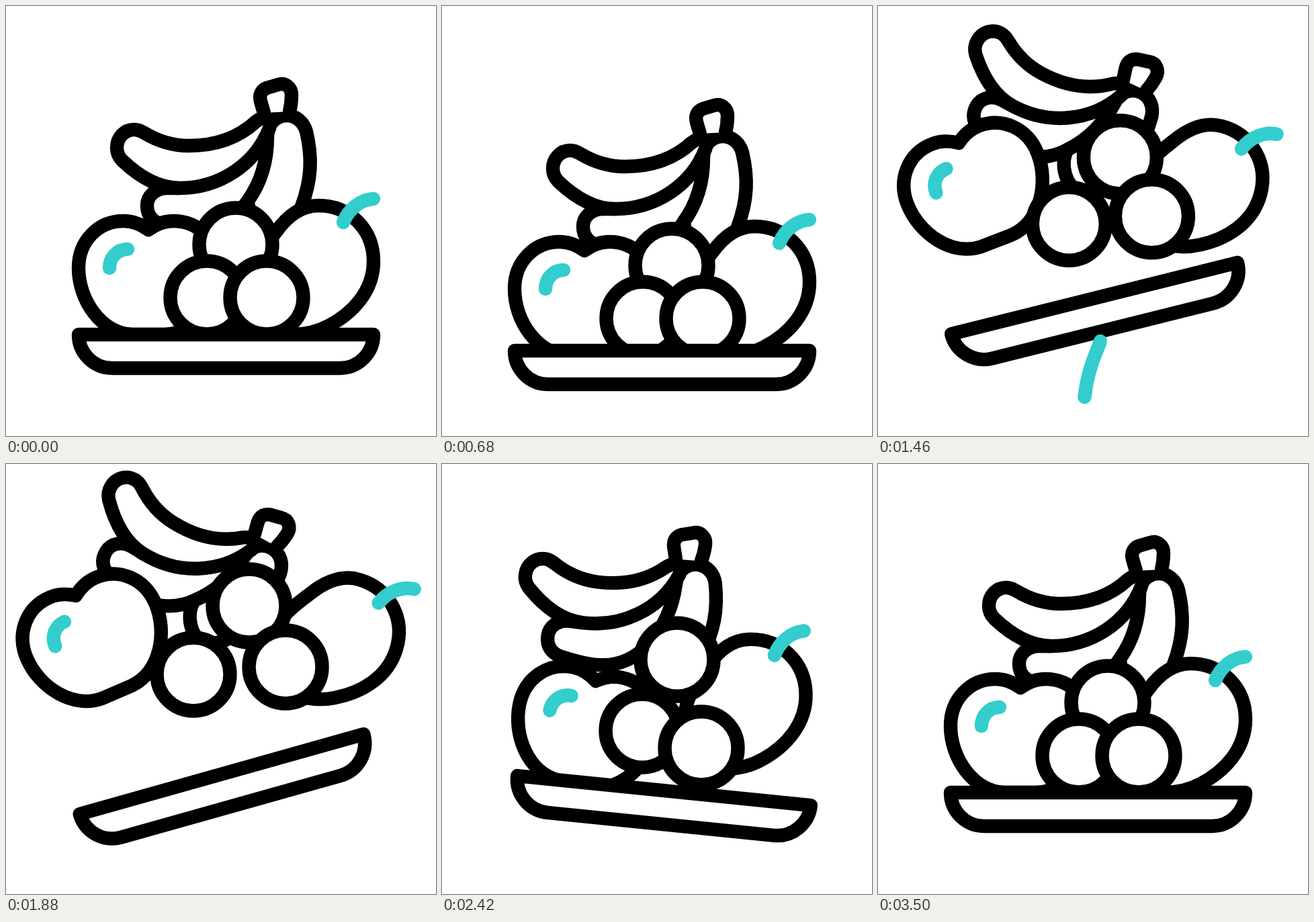
Recreate the animation shown at these times as an HTML page with a canvas. Size 640x640 px, loop 3600 ms.

```html
<!DOCTYPE html>
<html lang="en">
<head>
<meta charset="utf-8">
<title>Fruit plate</title>
<style>
html, body { margin: 0; width: 100%; height: 100%; overflow: hidden; background: #fff; }
canvas { display: block; width: 100vw; height: 100vh; }
</style>
</head>
<body>
<canvas id="stage" width="640" height="640"></canvas>
<script>
const ctx = document.getElementById('stage').getContext('2d');
const LOOP = 3600;
const BLACK = '#000', TEAL = '#33cdcd';

const circle = (x, y) => `M${x - 54.5} ${y}a54.5 54.5 0 1 1 109 0a54.5 54.5 0 1 1 -109 0Z`;
const shape = (d, color = BLACK) => ({ path: new Path2D(d), color });

// Poses are [x, y, degrees]: resting, thrown, floating, falling, bouncing.
const fruits = [
  { // bananas
    poses: [[300, 210, 0], [262.7, 125.2, 25.1], [271.5, 103.6, 31.9], [258, 181, 7.5], [293, 212, -6.7]],
    shapes: [
      shape('M258 271L240 271C222 271 210 283 210 297C210 313 219 322 233 325C255 329 275 332 292 330C322 328 346 311 360 290C378 265 389 235 389 195L396 172Z'),
      shape('M360 290C378 265 389 235 389 195C389 172 405 163 418 163C432 163 443 173 447 187C456 225 455 258 440 298C432 318 420 330 405 335C385 340 360 315 360 290Z'),
      shape('M396 165C387 164 380 166 372 172C345 197 312 208 272 208C249 208 226 201 206 189C201 186 196 184 191 184C176 184 165 196 165 211C165 219 168 225 173 230C193 249 223 271 258 271C318 271 371 236 392 182Z'),
      shape('M384 159L379 142C376 131 381 125 388 122L405 117C416 113 425 122 425 132C425 142 424 149 422 157')
    ]
  },
  { // mango
    poses: [[465, 385, 0], [478, 270, 14], [501, 256.5, 16.7], [459.7, 348.7, -1.7], [465, 385.3, -1]],
    shapes: [
      shape('M402 336C417 315 437 297 465 297C512 297 547 333 547 380C547 425 515 458 480 476C462 486 443 489 425 489C390 489 366 455 366 415C366 385 379 367 402 336Z'),
      shape('M502 322C510 302 528 288 547 287', TEAL)
    ]
  },
  { // apple
    poses: [[212, 405, 0], [157.8, 279, -19.3], [132.5, 262, -23.3], [214, 393.4, 12], [212, 405, -2]],
    shapes: [
      shape('M212 333C201 325 189 320 175 320C137 320 108 350 108 390C108 438 142 487 188 489L236 489C282 487 316 438 316 390C316 350 287 320 249 320C235 320 223 325 212 333Z'),
      shape('M154 390C154 374 166 362 181 362', TEAL)
    ]
  },
  { // berries
    poses: [[342, 355, 0], [359, 237, 0], [362, 211, 0], [350, 291, 0], [344, 348, 0]],
    shapes: [shape(circle(342, 355))]
  },
  {
    poses: [[299, 434, 0], [289, 334, 0], [279, 313, 0], [298, 397, 0], [299, 427, 0]],
    shapes: [shape(circle(299, 434))]
  },
  {
    poses: [[388, 434, 0], [400, 322, 0], [416, 302, 0], [386, 423, 0], [387, 423, 0]],
    shapes: [shape(circle(388, 434))]
  }
];

const plate = {
  poses: [[327.5, 489, 0], [323, 412, -12.5], [321, 461.5, -15.7], [330.5, 486, 5.75], [327.5, 489, 0.2]],
  shapes: [shape('M108 489L547 489A50 50 0 0 1 497 539L158 539A50 50 0 0 1 108 489Z')]
};

const streak = new Path2D('M337 453C337 478 333 496 326 512C312 545 306 575 306 610');
const STREAK_LENGTH = 162;

const mix = (a, b, k) => a.map((v, i) => v + (b[i] - v) * k);
const lower = ([x, y, r], dy) => [x, y + dy, r];

function timeline([rest, thrown, floating, falling, bouncing], dips, drop, landing) {
  return [
    [90, rest],
    [540, lower(rest, dips[0])],
    [680, lower(rest, dips[1])],
    [840, lower(rest, dips[2])],
    [1025, mix(thrown, floating, -0.04)],
    [1060, thrown],
    [1880, floating],
    [2070, mix(thrown, floating, 1.32)],
    [2165, drop],
    [2420, falling],
    ...landing,
    [2840, bouncing],
    [3200, rest]
  ];
}

for (const fruit of fruits) {
  fruit.keys = timeline(fruit.poses, [22, 31, 36], fruit.poses[1], []);
}
plate.keys = timeline(plate.poses, [14, 24, 34], [322, 468, -12], [[2640, [327.5, 495, -2.8]]]);

// Monotone cubic interpolation keeps the motion smooth without overshoot.
function poseAt(keys, t) {
  const last = keys.length - 1;
  if (t <= keys[0][0]) return keys[0][1];
  if (t >= keys[last][0]) return keys[last][1];
  const i = keys.findIndex(k => k[0] > t) - 1;
  const span = keys[i + 1][0] - keys[i][0];
  const u = (t - keys[i][0]) / span;
  return keys[i][1].map((from, c) => {
    const secant = n => (keys[n + 1][1][c] - keys[n][1][c]) / (keys[n + 1][0] - keys[n][0]);
    const slope = n => {
      if (n === 0 || n === last) return 0;
      const a = secant(n - 1), b = secant(n);
      return a * b > 0 ? 2 * a * b / (a + b) : 0;
    };
    const to = keys[i + 1][1][c];
    return from + (to - from) * u * u * (3 - 2 * u)
      + span * u * (1 - u) * ((1 - u) * slope(i) - u * slope(i + 1));
  });
}

function drawPart(part, t) {
  const [x, y, degrees] = poseAt(part.keys, t);
  const [restX, restY] = part.poses[0];
  ctx.save();
  ctx.translate(x, y);
  ctx.rotate(degrees * Math.PI / 180);
  ctx.translate(-restX, -restY);
  for (const { path, color } of part.shapes) {
    if (color === BLACK) ctx.fill(path);
    ctx.strokeStyle = color;
    ctx.stroke(path);
  }
  ctx.restore();
}

const ramp = (t, from, to) => Math.min(1, Math.max(0, (t - from) / (to - from)));

function drawStreak(t) {
  const head = 61 * ramp(t, 1000, 1060) + (STREAK_LENGTH - 61) * ramp(t, 1060, 1620);
  const tail = STREAK_LENGTH * ramp(t, 1300, 1860);
  if (head - tail < 0.5) return;
  ctx.save();
  ctx.strokeStyle = TEAL;
  ctx.setLineDash([head - tail, 1000]);
  ctx.lineDashOffset = -tail;
  ctx.stroke(streak);
  ctx.restore();
}

function draw(t) {
  ctx.fillStyle = '#fff';
  ctx.fillRect(0, 0, 640, 640);
  ctx.lineWidth = 20.4;
  ctx.lineCap = ctx.lineJoin = 'round';
  for (const fruit of fruits) drawPart(fruit, t);
  drawPart(plate, t);
  drawStreak(t);
}

const start = performance.now();
function tick() {
  draw((performance.now() - start) % LOOP);
  requestAnimationFrame(tick);
}
tick();
</script>
</body>
</html>
```
